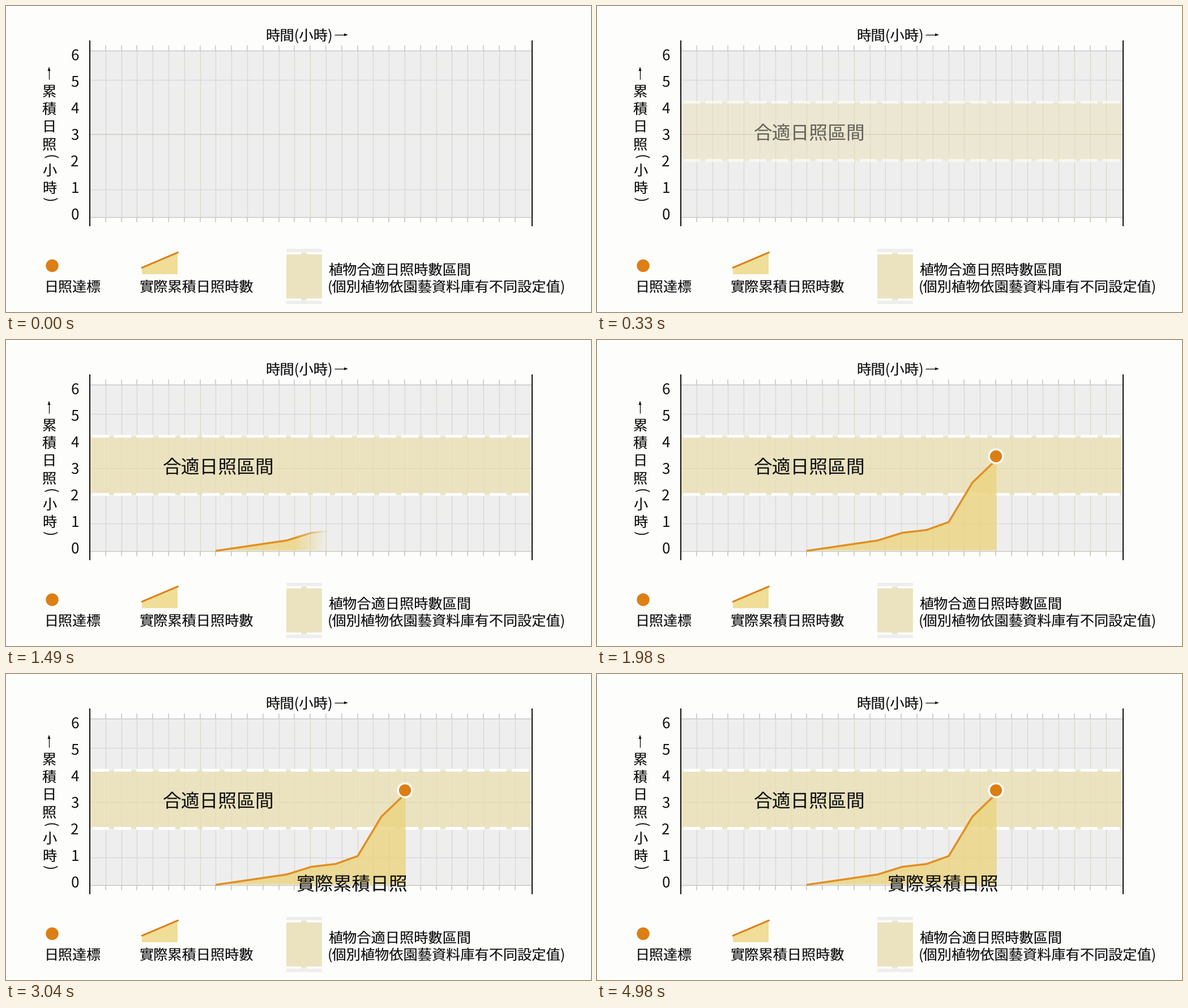
These frames come from a looping animation (1033x542 px, 5.01 s). A matplotlib script:

```python
import numpy as np
import matplotlib.pyplot as plt
from matplotlib.animation import FuncAnimation
from matplotlib.patches import Circle, Polygon, Rectangle
from matplotlib.path import Path

W, H, DPI = 1033, 542, 100
STEP, LOOP = 30, 5010
LEFT, RIGHT, TOP, BOTTOM = 148, 929, 79, 374
INK, ORANGE, PLOT_BG = "#101010", "#dc7f14", "#eeeeef"
BAND = dict(color="#ebe0b0", alpha=0.74, lw=0)
FILL = (0.925, 0.835, 0.5)

plt.rcParams["font.family"] = "Noto Sans CJK JP"
plt.rcParams["text.hinting"] = "none"
fig = plt.figure(figsize=(W / DPI, H / DPI), dpi=DPI, facecolor="#fdfdfc")
ax = fig.add_axes([0, 0, 1, 1])
ax.axis("off")


def px(n):
    return n * 72 / DPI


def line(x0, y0, x1, y1, color, width, z=1, **kw):
    ax.plot([x0, x1], [y0, y1], color=color, lw=px(width), zorder=z,
            solid_capstyle="butt", **kw)


def rect(x0, y0, x1, y1, z=0, **kw):
    return ax.add_patch(Rectangle((x0, y0), x1 - x0, y1 - y0, zorder=z, **kw))


def label(x, cy, s, em=25.2, **kw):
    """Text with its ideographs centred on height cy."""
    return ax.text(x, cy + 0.38 * em, s, size=px(em), color=INK,
                   va="baseline", zorder=9, **kw)


def draw_grid():
    rect(LEFT, TOP, RIGHT, BOTTOM, color=PLOT_BG, lw=0)
    for x in 175.7 + 27.8 * np.arange(27):
        line(x, TOP, x, BOTTOM, "#d9d9cb", 1.3)
        line(x, 70, x, TOP, "#c6c6d0", 1.6)
        line(x, BOTTOM, x, 383, "#c6c6c8", 1.6)
    for y, color in ((TOP, "#c5c5cb"), (131, "#d9d9da"), (227, "#c6c6b6"),
                     (325, "#d9d9da"), (BOTTOM, "#c8c8b6")):
        line(LEFT, y, RIGHT, y, color, 1.4)
    for x in (LEFT, RIGHT):
        line(x, 61, x, 390, INK, 2, z=6)


def draw_axis_labels():
    label(458, 51, "時間(小時)", 25.4)
    line(580, 51, 599, 51, INK, 1.3)
    ax.add_patch(Polygon([(597, 48.5), (604, 51), (597, 53.5)], color=INK, lw=0))
    line(76, 114, 76, 130, INK, 1.3)
    ax.add_patch(Polygon([(73.5, 115), (76, 107.5), (78.5, 115)], color=INK, lw=0))
    for n in range(7):
        ax.text(121.5, 368.5 - 47 * n + 9.5, str(n), size=px(26), color=INK,
                ha="center", va="baseline")
    for ch, y in zip("累積日照小時", (150, 181, 213, 244, 290, 321)):
        label(76.5, y, ch, ha="center")
    for ch, y in (("(", 267), (")", 343)):
        ax.text(76.5, y, ch, size=px(25.2), color=INK, rotation=-90,
                ha="center", va="center")


def draw_legend():
    ax.add_patch(Circle((81.5, 460), 11.2, color=ORANGE, lw=0))
    label(68, 496, "日照達標", 25)
    ax.add_patch(Polygon([(240, 463), (303, 437), (303, 475), (240, 475)],
                         color="#efdd98", lw=0))
    ax.plot([240, 303.5], [463.5, 436.5], color=ORANGE, lw=px(3),
            solid_capstyle="round")
    label(236, 496, "實際累積日照時數")
    rect(495, 430, 558, 528, color=PLOT_BG, lw=0)
    rect(495, 438, 558, 519.5, z=1, **BAND)
    for y in (436, 517.5):
        for x0, x1 in ((494, 521), (531, 559)):
            rect(x0, y, x1, y + 4.2, z=2, color="#fdfdfc", lw=0)
    label(569.5, 466, "植物合適日照時數區間")
    label(568, 496, "(個別植物依園藝資料庫有不同設定值)")


def make_band():
    right = 925.5
    parts = [(rect(LEFT + 1, 171, right, 273.5, z=2, **BAND), BAND["alpha"])]
    for k in range(20):
        x0, x1 = max(LEFT + 1, 152 + 39 * k), min(182 + 39 * k, right)
        for y in (168.3, 271):
            parts.append((rect(x0, y, x1, y + 5, z=3, color="white", lw=0), 1))
    return parts


def stroke(pts, width):
    """Outline of a polyline with mitred corners."""
    d = np.diff(pts, axis=0)
    n = np.column_stack([-d[:, 1], d[:, 0]]) / np.hypot(*d.T)[:, None]
    m = np.vstack([n[:1], n[:-1] + n[1:], n[-1:]])
    ref = np.vstack([n[:1], n])
    off = m / (m * ref).sum(1)[:, None] * width / 2
    return Path(np.vstack([pts + off, (pts - off)[::-1], (pts + off)[:1]]))


X0, X1, SOFT = 360, 725, 60
COLS = np.arange(X0, X1) + 0.5


def wipe_layer(path, rgb, alpha, z):
    """Flat colour inside a path, revealed column by column."""
    data = np.zeros((1, COLS.size, 4))
    data[..., :3] = rgb
    im = ax.imshow(data, extent=(X0, X1, 385, 185), aspect="auto",
                   interpolation="nearest", zorder=z)
    im.set_clip_path(path, transform=ax.transData)
    return im, data, alpha


draw_grid()
draw_axis_labels()
draw_legend()
band = make_band()
curve = np.array([(370, 373.5), (496, 355), (539, 341.5), (582, 336.5),
                  (621, 322.5), (663, 252.5), (704.5, 212.5)])
area = Path(np.vstack([curve, [(705.5, 211.5), (705.5, 372.5), (370, 372.5)]]))
layers = [
    wipe_layer(area, FILL, 0.8, 4),
    wipe_layer(stroke(curve, 3.5), (0.88, 0.565, 0.14), 1, 5),
    wipe_layer(Path.circle((704.5, 206), 14), (1, 1, 1), 1, 6),
    wipe_layer(Path.circle((704.5, 206), 10.6), (0.863, 0.498, 0.078), 1, 7),
]
band.append((label(277, 224, "合適日照區間", 32.8), 1))
actual = label(512, 371, "實際累積日照", 32.8)
ax.set_xlim(0, W)
ax.set_ylim(H, 0)


def ramp(t, start, length):
    return min(max((t - start) / length, 0), 1)


def update(i):
    t = i * STEP
    shown = ramp(t, 0, 540)
    for artist, top in band:
        artist.set_alpha(top * shown)
    edge = 365 + 420 * ramp(t, 960, 1050)
    reveal = np.clip((edge - COLS) / SOFT, 0, 1)
    for im, data, top in layers:
        data[0, :, 3] = top * reveal
        im.set_data(data)
    actual.set_alpha(ramp(t, 2010, 530))
    return []


anim = FuncAnimation(fig, update, frames=LOOP // STEP, interval=STEP,
                     init_func=lambda: update(0), repeat=True, repeat_delay=0)
plt.show()
```
